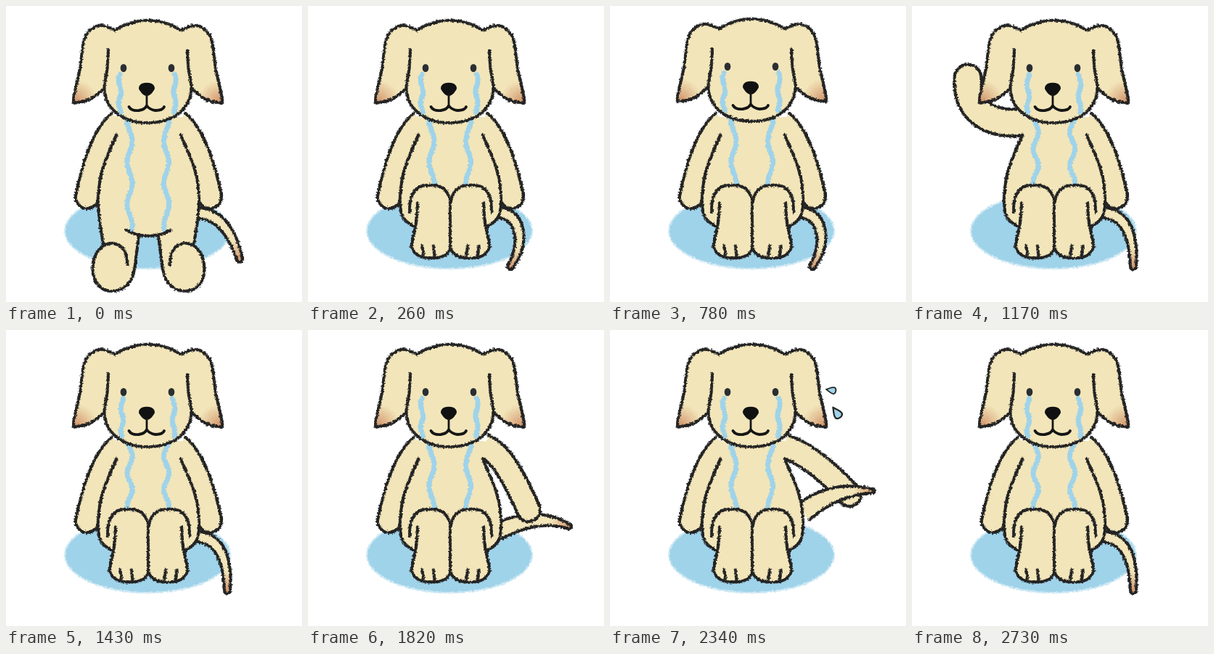
These frames come from a looping animation (408 by 408 pixels, 2.93 s). An HTML page:

```html
<!DOCTYPE html>
<html lang="en">
<head>
<meta charset="utf-8">
<title>Crying puppy</title>
<style>
  html, body { margin: 0; width: 100%; height: 100%; overflow: hidden; background: #fff; }
  svg { display: block; width: 100vw; height: 100vh; }
  path { stroke-linecap: round; stroke-linejoin: round; }
</style>
</head>
<body>
<svg viewBox="0 0 408 408" xmlns="http://www.w3.org/2000/svg">
  <defs id="defs">
    <filter id="crayon" filterUnits="userSpaceOnUse" x="0" y="0" width="408" height="408" color-interpolation-filters="sRGB">
      <feTurbulence type="fractalNoise" baseFrequency="0.38" numOctaves="2" seed="4" result="noise"/>
      <feDisplacementMap in="SourceGraphic" in2="noise" scale="4" xChannelSelector="R" yChannelSelector="G"/>
    </filter>
  </defs>
  <g id="rough" filter="url(#crayon)"></g>
  <g id="clean"></g>
</svg>
<script>
const FUR = '#f2e5b9', INK = '#242424', WATER = '#9fd3ea';
const BODY_AXIS = 393, HEAD_AXIS = 391;
const STEP = 130, COUNT = 22, LOOP = 2930;
const $ = id => document.getElementById(id);

// ---- Geometry ----
const pts = text => text.split(' ').map(p => p.split(',').map(Number));
const flip = (list, axis) => list.map(([x, y]) => [axis - x, y]);

// Smooth path through a list of points.
function curve(list, start = 'M') {
  let d = start + list[0];
  for (let i = 0; i < list.length - 1; i++) {
    const b = list[i], c = list[i + 1], a = list[i - 1] || b, e = list[i + 2] || c;
    const handle = (p, from, to) => p.map((v, k) => v + (to[k] - from[k]) / 6);
    d += `C${handle(b, a, c)} ${handle(c, e, b)} ${c}`;
  }
  return d;
}

// Superellipse arc in degrees; a lower power gives squarer corners, shrink narrows it along the way.
function arc(cx, cy, rx, ry, from, to, power = 1, shrink = 0) {
  const bend = v => Math.sign(v) * Math.abs(v) ** power, n = 12;
  return Array.from({ length: n + 1 }, (_, i) => {
    const a = (from + (to - from) * i / n) * Math.PI / 180;
    return [cx + rx * (1 - shrink * i / n) * bend(Math.cos(a)), cy + ry * bend(Math.sin(a))];
  });
}

const bezier = (p, t) => [0, 1].map(k =>
  (1 - t) ** 3 * p[0][k] + 3 * t * (1 - t) ** 2 * p[1][k] + 3 * t * t * (1 - t) * p[2][k] + t ** 3 * p[3][k]);

// Outline of a round-ended limb along a bezier spine.
function limb(spine, halfWidth) {
  const n = 10, near = [], far = [];
  let heading = 0;
  for (let i = 0; i <= n; i++) {
    const t = i / n, w = halfWidth(t), [x, y] = bezier(spine, t);
    const [x0, y0] = bezier(spine, t - 0.01), [x1, y1] = bezier(spine, t + 0.01);
    heading = Math.atan2(y1 - y0, x1 - x0);
    near.push([x + w * Math.sin(heading), y - w * Math.cos(heading)]);
    far.unshift([x - w * Math.sin(heading), y + w * Math.cos(heading)]);
  }
  const r = halfWidth(1), deg = heading * 180 / Math.PI;
  return [...near, ...arc(...spine[3], r, r, deg - 90, deg + 90).slice(1, -1), ...far];
}

// ---- Drawing ----
const fill = (d, color = FUR) => `<path d="${d}Z" fill="${color}"/>`;
const stroke = (d, color, width, extra = '') =>
  `<path d="${d}" fill="none" stroke="${color}" stroke-width="${width}" ${extra}/>`;
// A solid core with beads along it gives the bristly crayon edge.
const line = d => stroke(d, INK, 3.2) + stroke(d, INK, 4.8, 'stroke-dasharray="0.1 3.7" stroke-opacity=".8"');
const shape = (list, color) => fill(curve(list), color) + line(curve(list));
const both = (list, axis, draw) => draw(list) + draw(flip(list, axis));

function tint(id, x, y, r) {
  $('defs').insertAdjacentHTML('beforeend',
    `<radialGradient id="${id}" gradientUnits="userSpaceOnUse" cx="${x}" cy="${y}" r="${r}">
      <stop offset="0" stop-color="#d3976c"/><stop offset=".35" stop-color="#dfb48a"/>
      <stop offset="1" stop-color="${FUR}"/></radialGradient>`);
  return `url(#${id})`;
}

// ---- Limbs ----
function tail(name, text, base, tip) {
  const spine = pts(text);
  return shape(limb(spine, t => tip + (base - tip) * (1 - t * t)), tint(name, ...spine[3], 26));
}
const tails = {
  right: tail('right', '265,285 295,287 313,315 322,349', 7.5, 4),
  mid: tail('mid', '265,285 293,287 306,315 305,359', 7.5, 4),
  left: tail('left', '264,285 289,285 303,322 279,359', 7.5, 4),
  low: tail('low', '262,278 290,263 325,255 360,271', 11, 3),
  high: tail('high', '266,252 288,233 320,218 362,222', 13, 2.5)
};

const arm = (spine, width = 16) => shape(limb(spine, () => width));
const restSpine = pts('156,160 132,180 119,230 112,263');
const leftArm = { rest: arm(restSpine), up: arm(pts('153,160 100,166 74,138 77,99'), 18.5) };
const rightArm = {
  rest: arm(flip(restSpine, BODY_AXIS)),
  mid: arm(pts('243,160 268,170 288,212 304,248')),
  out: arm(pts('240,160 270,170 300,195 330,227'))
};

// ---- Body and legs ----
function body(text) {
  const side = pts(text), other = flip(side, BODY_AXIS).reverse();
  return fill(curve(side) + 'L196,316' + curve(other, 'L') + 'L247,153L146,153') +
    both(side, BODY_AXIS, s => line(curve(s)));
}
const bodies = {
  bent: body('152,178 133,225 127,264 131,291 150,307'),
  out: body('152,178 133,225 127,264 129,295 134,328')
};

const knee = arc(168.5, 284, 28.5, 37, 180, 360, 0.75);
const foot = [[151, 272], [149, 298], ...arc(170, 328, 27, 19.5, 180, 0, 0.85), [197, 270]];
const toes = [157.5, 173].map(x => [[x, 331], [x + 1.5, 344]]);
const sole = [[183, 317], [180, 340], ...arc(146, 360, 31, 33, 5, 355, 0.95, 0.3)];
const thigh = pts('135,328 165,309 183,317 177,362 140,345');
const legs = {
  bent: both(knee, BODY_AXIS, shape) + both(foot, BODY_AXIS, shape) +
    toes.map(toe => both(toe, BODY_AXIS, t => line(curve(t)))).join(''),
  out: both(thigh, BODY_AXIS, p => fill('M' + p.join('L'))) + both(sole, BODY_AXIS, shape) +
    line('M166,309Q180,317 196,317Q212,317 227,309')
};

// ---- Head ----
const crown = 'M150,33.5Q195.500,6 241,33.5';
const face = [[141, 61], [139.5, 86], ...arc(195.5, 112, 60, 49, 180, 0, 0.94), [251.5, 86], [250, 61]];
const ear = pts('150,33 128,27 109,43 102,86 93,129 98,133 117,128 136,113');
const ears = [['ear-l', ear, 97], ['ear-r', flip(ear, HEAD_AXIS), 294]].map(([id, e, x]) =>
  fill(curve(e) + 'L195,61', tint(id, x, 131, 29)) + line(curve(e))).join('');
const head = ears + fill(crown + curve([...face].reverse(), 'L')) + line(crown) + line(curve(face));

const features =
  [162, 228].map(x => `<ellipse cx="${x}" cy="85.5" rx="4.3" ry="5.6" fill="#2a2e33"/>`).join('') +
  fill('M187,107Q194,104.500 201,107Q207,111 204,116Q199,124 194,124Q189,124 184,116Q181,111 187,107', '#111') +
  stroke('M194,122V138', '#151515', 2.8) +
  stroke('M169.500,139Q173,145 183,144Q191,143 194,137.500Q198,143 206,144Q216,144 218,139', '#151515', 3.8);

// ---- Water ----
function stream(x, amp, top, end, period, crest) {
  const list = [];
  for (let y = top; y <= end; y += 4)
    list.push([x + amp * Math.cos((y - crest) / period * 2 * Math.PI), y]);
  return stroke(curve(list), WATER, 7);
}
const bellyTears = odd => [[170.5, 3.6], [221, -3.6]].map(([x, amp]) =>
  stream(x, amp, 152, 308, odd ? 46 : 58, odd ? 174 : 186)).join('');
const faceTears = odd => [[157 + 3 * odd, 1.7], [232.5 - 1.5 * odd, -1.7]].map(([x, amp]) =>
  stream(x, amp, 94, 146, 32, 118 + 6 * odd)).join('');

const drop = (x, y, angle, size) =>
  `<path d="M0,-9C2,-4 6,0 5.500,5C4,9 -4,9 -5.500,5C-6,0 -2,-4 0,-9Z" fill="${WATER}" stroke="${INK}"
    stroke-width="2.200" transform="translate(${x} ${y}) rotate(${angle}) scale(${size})"/>`;
const sweat = drop(305, 83, -80, 0.8) + drop(312.5, 114, -35, 1);
const puddle = `<ellipse cx="195" cy="310" rx="113" ry="51" fill="${WATER}"
  stroke="${WATER}" stroke-width="4" stroke-opacity=".5"/>`;

// ---- Animation ----
const within = (n, a, b) => n >= a && n <= b;

function tailAt(n) {
  if (n === 14) return 'low';
  if (within(n, 15, 18)) return 'high';
  const beat = n > 18 ? n + 2 : n;
  return ['right', 'mid', 'left', 'mid'][beat % 4];
}

function draw(n) {
  const odd = n % 2, reach = within(n, 15, 18), name = tailAt(n), pose = n ? 'bent' : 'out';
  const limbs = leftArm[within(n, 8, 10) ? 'up' : 'rest'] +
    rightArm[reach ? 'out' : n === 14 || n === 19 ? 'mid' : 'rest'];
  const bob = `<g transform="translate(0 ${within(n, 5, 6) ? -2 : 0})">`;
  $('rough').innerHTML = puddle + (reach ? limbs + tails[name] : tails[name] + limbs) +
    bodies[pose] + bellyTears(odd) + legs[pose] + bob + head + faceTears(odd) + '</g>';
  const splash = `<g transform="translate(${3 * odd} ${-5 * odd})">${sweat}</g>`;
  $('clean').innerHTML = bob + features + '</g>' + (reach ? splash : '');
}

let shown = -1;
const begin = performance.now();
function tick() {
  const time = (performance.now() - begin) % LOOP;
  const n = Math.min(COUNT - 1, Math.floor(time / STEP));
  if (n !== shown) draw(shown = n);
  requestAnimationFrame(tick);
}
tick();
</script>
</body>
</html>
```
